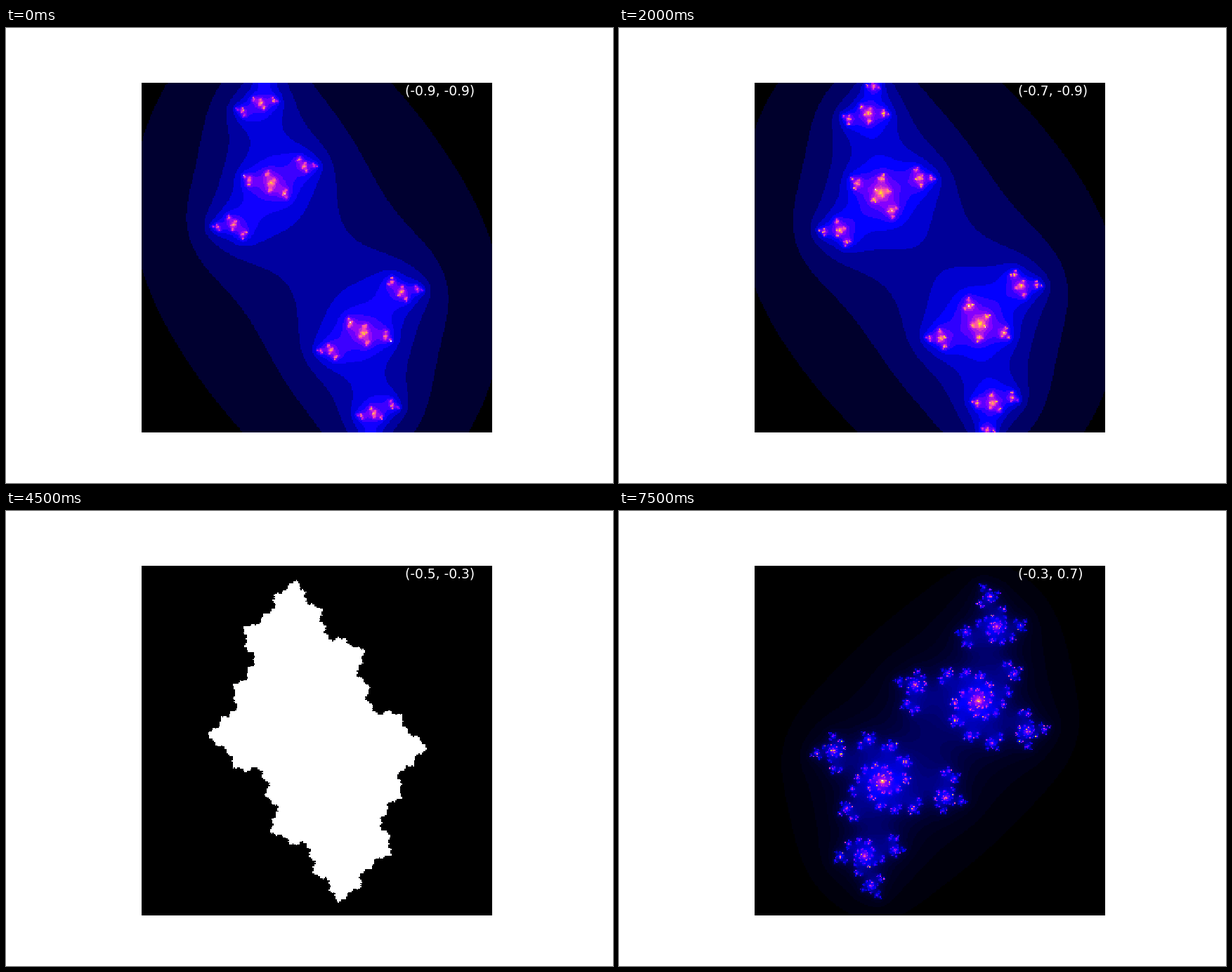
These frames come from a looping animation (864 px wide and 648 px high, 8 s). A matplotlib script:

```python
import numpy as np
import matplotlib.pyplot as plt
from matplotlib.animation import FuncAnimation

WIDTH, HEIGHT, DPI = 864, 648, 135
LEFT, TOP, RIGHT, BOTTOM = 193.05, 78.05, 691.95, 575.95   # picture edges, px
SIZE = 300          # samples per side, covering -1.5 .. 1.5
MAX_ITER = 1000
BAILOUT = 10
BLACK = 0.008       # share of the value range shown as black
FRAMES = 16
INTERVAL = 500
PER_ROW = 10        # imaginary steps for each real part


def parameter(frame):
    """Walk the grid of constants in steps of 0.2, skipping evenly."""
    row, col = divmod(int(frame * 2.56), PER_ROW)
    return round(-0.9 + 0.2 * row, 1), round(-0.9 + 0.2 * col, 1)


def julia(c):
    """Escape times, real axis pointing down and imaginary axis to the right."""
    axis = (np.arange(SIZE) - SIZE // 2) / 100
    z = (axis[:, None] + 1j * axis[None, :]).ravel()
    count = np.full(z.size, MAX_ITER)
    alive = np.arange(z.size)
    for n in range(MAX_ITER):
        z = z * z + c
        out = z.real ** 2 + z.imag ** 2 > BAILOUT ** 2
        if out.any():
            count[alive[out]] = n
            z, alive = z[~out], alive[~out]
            if not z.size:
                break
    return count.reshape(SIZE, SIZE)


params = [parameter(k) for k in range(FRAMES)]
images = [julia(complex(*p)) for p in params]

fig = plt.figure(figsize=(WIDTH / DPI, HEIGHT / DPI), dpi=DPI)
ax = fig.add_axes([LEFT / WIDTH, 1 - BOTTOM / HEIGHT,
                   (RIGHT - LEFT) / WIDTH, (BOTTOM - TOP) / HEIGHT])
ax.axis("off")
picture = ax.imshow(images[0], cmap="gnuplot2", interpolation="nearest",
                    aspect="auto")
label = ax.text(225, 10, "", color="white", fontsize=10)


def update(frame):
    data = images[frame]
    low, high = data.min(), data.max()
    picture.set_data(data)
    picture.set_clim(low + BLACK * (high - low), high)
    re, im = params[frame]
    label.set_text(f"({re}, {im})")
    return picture, label


anim = FuncAnimation(fig, update, frames=FRAMES, interval=INTERVAL,
                     repeat=True, repeat_delay=0, blit=False)
plt.show()
```
